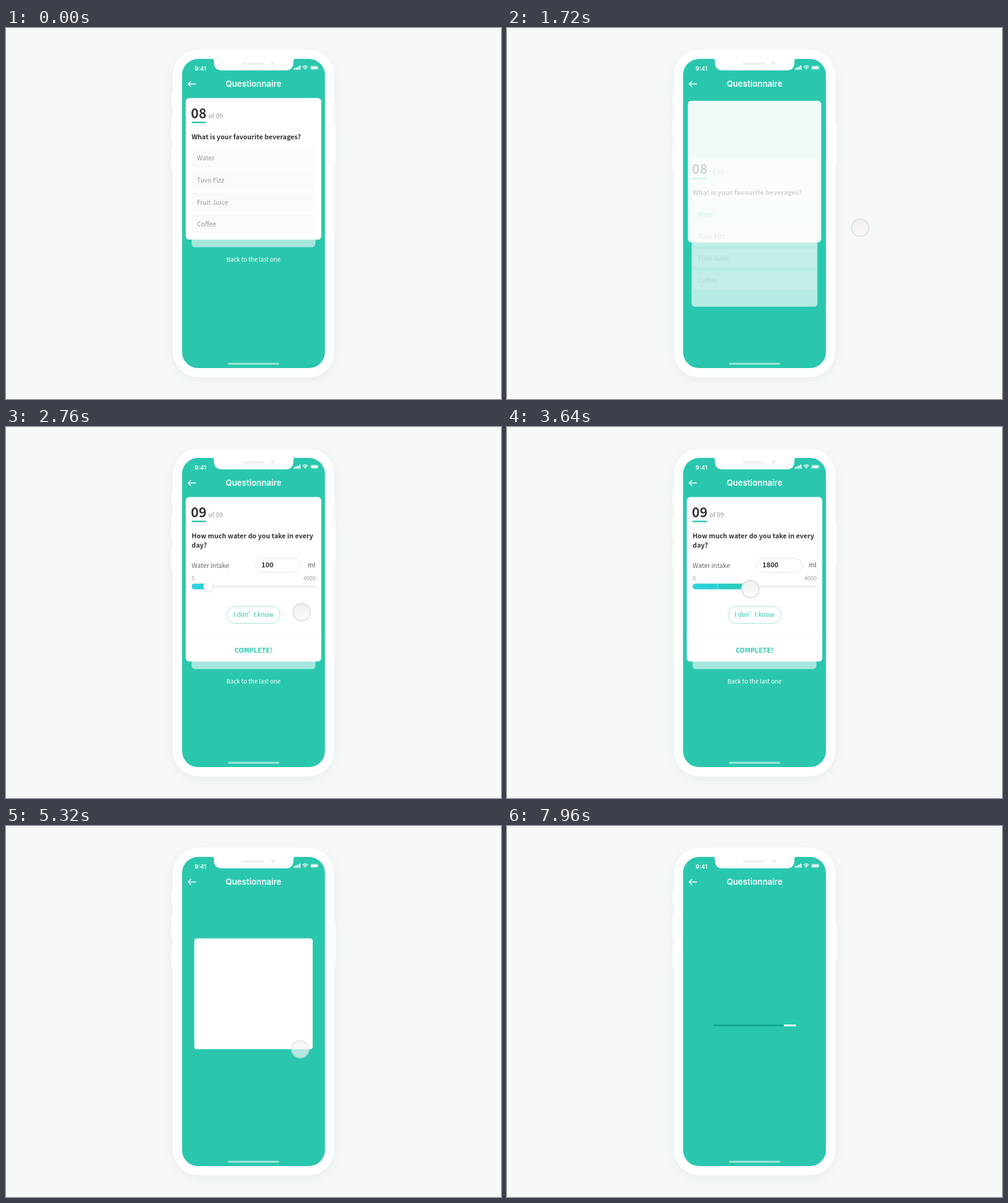
These frames come from a looping animation (800x600 px, 8 s). An HTML page:

```html
<!DOCTYPE html>
<html lang="en">
<head>
<meta charset="utf-8">
<title>Questionnaire</title>
<style>
  html, body { margin: 0; width: 100%; height: 100%; overflow: hidden; background: #f5f9f8; }
  svg { display: block; width: 800px; height: 600px; }
  text { font-family: "Noto Sans CJK SC", "Noto Sans", sans-serif; font-size: 10.4px; }
  .ui { font-family: Inter, sans-serif; font-weight: 600; fill: #fff; }
  .mid { text-anchor: middle; }
  .end { text-anchor: end; }
  .bold { font-weight: 700; fill: #333; }
  .num { font-size: 21.4px; }
  .ask { font-size: 10.7px; }
  .grey { fill: #999; }
  .teal { fill: #2ac7ae; }
  .phone { filter: drop-shadow(0 4px 8px rgba(40, 90, 80, .07)); }
  .knob { filter: drop-shadow(0 1px 1.5px rgba(0, 0, 0, .16)); }
</style>
</head>
<body>
<svg viewBox="0 0 800 600">
  <defs>
    <linearGradient id="water" gradientUnits="userSpaceOnUse" x1="300" x2="392" y1="0" y2="0">
      <stop offset="0" stop-color="#2dd4e2"/><stop offset="1" stop-color="#2ac7ae"/>
    </linearGradient>
    <linearGradient id="touch" x2="0" y2="1">
      <stop offset="0" stop-color="#eee"/><stop offset="1" stop-color="#fdfdfd"/>
    </linearGradient>
    <clipPath id="screen"><rect x="284.5" y="50" width="231" height="500" rx="26"/></clipPath>
  </defs>

  <g class="phone" fill="#fff">
    <rect x="267.5" y="107" width="6" height="19" rx="1"/>
    <rect x="267.5" y="144" width="6" height="38" rx="1"/>
    <rect x="267.5" y="192" width="6" height="38.500" rx="1"/>
    <rect x="527" y="157" width="6" height="62" rx="1"/>
    <rect x="269.500" y="35" width="261.500" height="530" rx="42"/>
  </g>

  <g clip-path="url(#screen)">
    <rect x="284" y="50" width="232" height="500" fill="#2ac7ae"/>
    <path d="M332 49.500q4 0 4 4v2q0 13 13 13h102.500q13 0 13-13v-2q0-4 4-4z" fill="#fff"/>
    <rect x="381" y="55.500" width="36" height="4" rx="2" fill="#f1f1f1"/>
    <circle cx="431" cy="57" r="3.300" fill="#f1f1f1"/>

    <text class="ui" x="304.700" y="68.600" font-size="9.500" style="font-size:9.500px">9:41</text>
    <g fill="#fff">
      <rect x="465.300" y="64.800" width="2" height="2.700" rx=".5"/>
      <rect x="468.100" y="63.700" width="2" height="3.800" rx=".5"/>
      <rect x="471" y="62.300" width="2" height="5.200" rx=".5"/>
      <rect x="473.900" y="60.800" width="2" height="6.700" rx=".5"/>
      <rect x="492.900" y="62.200" width="10.700" height="4.100" rx=".8"/>
      <path d="M483.500 67.400l-1.500-1.600q1.500-1.100 3 0z"/>
    </g>
    <g fill="none" stroke="#fff">
      <path d="M479.200 63q4.300-3.600 8.600 0M480.700 64.700q2.800-2.300 5.600 0" stroke-width="1.200"/>
      <rect x="491.900" y="61.200" width="12.700" height="6.100" rx="1.700" stroke-width=".6" opacity=".6"/>
      <path d="M307 90.500h-12.600m4.800-4.700l-4.800 4.700 4.800 4.700" stroke-width="1.300"/>
    </g>
    <text class="ui mid" x="400" y="95" style="font-size:13.300px">Questionnaire</text>
    <rect x="358.700" y="541.500" width="83" height="3" rx="1.500" fill="#fff" opacity=".55"/>

    <text id="back" class="mid" fill="#fff" style="font-size:9.600px">Back to the last one</text>
    <rect id="rear" rx="5.500" fill="#fff"/>
    <rect id="front" fill="#fff"/>

    <g id="first">
      <text class="bold num" x="298.800" y="145.600">08</text>
      <text class="grey" x="327" y="145.600">of 09</text>
      <rect x="300" y="151.500" width="23.500" height="2.500" rx="1" fill="#2ac7ae"/>
      <text class="bold ask" x="300" y="179.500">What is your favourite beverages?</text>
      <g id="rows"></g>
    </g>

    <g id="second">
      <text class="bold num" x="298.800" y="145.600">09</text>
      <text class="grey" x="327" y="145.600">of 09</text>
      <rect x="300" y="151.500" width="23.500" height="2.500" rx="1" fill="#2ac7ae"/>
      <text class="bold ask" x="300" y="179.500">How much water do you take in every</text>
      <text class="bold ask" x="300" y="195">day?</text>
      <text x="300" y="227.500" fill="#666">Water intake</text>
      <rect x="403" y="212.300" width="74" height="22.500" rx="11.250" fill="#fff" stroke="#ddd" stroke-width=".8"/>
      <text id="amount" class="bold" x="412.700" y="227.300" style="font-size:11px"></text>
      <text class="end" x="500.300" y="227.300" fill="#555">ml</text>
      <text class="grey" x="300" y="248.200" style="font-size:8.800px">0</text>
      <text class="grey end" x="500.300" y="248.200" style="font-size:8.800px">4000</text>
      <rect x="300" y="255.300" width="200" height="5" rx="2.500" fill="#f3f3f3"/>
      <rect id="fill" x="300" y="253.200" height="9.300" rx="4.650" fill="url(#water)"/>
      <path id="tickA" d="M340 253v9.500" stroke="#fff" stroke-width=".8" opacity=".6"/>
      <path id="tickB" d="M380 253v9.500" stroke="#fff" stroke-width=".8" opacity=".6"/>
      <circle id="knob" class="knob" cy="258" r="7.500" fill="#fff"/>
      <rect x="357" y="290" width="86" height="27.700" rx="13.850" fill="#fff" stroke="#2ac7ae" stroke-opacity=".5" stroke-width=".9"/>
      <text class="teal" x="368" y="307.400" style="font-size:10.200px">I don’<tspan x="400.200">t know</tspan></text>
      <path d="M290.500 342.500h219" stroke="#f3f3f3"/>
      <text class="bold mid" x="400" y="364.800" style="font-size:10.700px;fill:#2ac7ae">COMPLETE!</text>
    </g>

    <rect id="progress" x="332.500" y="321" height="3" rx="1.500" fill="#12a892"/>
  </g>

  <circle id="cursor" r="14" fill="url(#touch)" stroke="#e0e1e1" stroke-width="2"/>
</svg>

<script>
const LOOP = 8000;
const $ = id => document.getElementById(id);
const set = (id, attrs) => { for (const k in attrs) $(id).setAttribute(k, attrs[k]); };
const lerp = (a, b, p) => a + (b - a) * p;
const span = (t, a, b) => Math.min(1, Math.max(0, (t - a) / (b - a)));
const sine = p => (1 - Math.cos(Math.PI * p)) / 2;
const cubic = p => p < .5 ? 4 * p ** 3 : 1 - 4 * (1 - p) ** 3;
const ease = (t, a, b) => sine(span(t, a, b));
const bump = (t, centre, width) =>
  Math.abs(t - centre) < width / 2 ? Math.cos(Math.PI * (t - centre) / width) ** 2 : 0;

const drinks = ['Water', 'Tuvo Fizz', 'Fruit Juice', 'Coffee'];
$('rows').innerHTML = drinks.map((name, i) => {
  const y = 195 + i * 35.7;
  return `<rect id="row${i}" x="300" y="${y}" width="200" height="30.500" rx="3" fill="#fafafa"/>
    <text id="drink${i}" x="308.500" y="${y + 19.2}" fill="#999" font-weight="500">${name}</text>`;
}).join('');

// start, end, x, y, easing
const path = [
  [560, 860, 430, 210, sine],
  [1120, 1640, 571, 323, sine],
  [2520, 3080, 331.5, 262, sine],
  [3160, 3800, 394.5, 262, p => 1 - (1 - p) ** 3],
  [4200, 4400, 399.5, 262, sine],
  [4560, 4920, 399.5, 361, cubic],
  [5000, 5480, 501, 361, sine]
];

function drawCursor(t) {
  let x = 582, y = 270;
  for (const [a, b, tx, ty, curve] of path) {
    const p = curve(span(t, a, b));
    x = lerp(x, tx, p);
    y = lerp(y, ty, p);
  }
  set('cursor', { cx: x, cy: y, opacity: span(t, 540, 640) * (1 - span(t, 5240, 5480)) });
}

function drawCards(t) {
  const swap = bump(t, 1853, 953);
  const drop = 168 * bump(t, 1974, 1070);
  const grow = ease(t, 1440, 2160);
  const shut = ease(t, 5040, 5760);
  const tall = 229 + 37 * grow;

  const width = 219 - 19 * swap;
  set('front', {
    x: lerp(400 - width / 2, 332.5, shut),
    y: lerp(113.3 + drop + 7 * swap, 321, shut),
    width: lerp(width, 135, shut),
    height: lerp(tall, 3, shut),
    rx: lerp(5.5, 1.5, shut),
    opacity: 1 - .42 * swap
  });

  const rearWidth = 200 + 19 * swap;
  set('rear', {
    x: 400 - rearWidth / 2,
    y: 113.3 + (1 - swap) * (12.2 + 37 * grow),
    width: rearWidth,
    height: 229,
    opacity: (.58 + .42 * swap) * (1 - span(t, 5040, 5240))
  });

  const move = `translate(0 ${drop})`;
  set('first', { transform: move, opacity: 1 - span(t, 1400, 1800) });
  set('second', {
    transform: move,
    opacity: span(t, 2260, 2620) * (1 - span(t, 5040, 5280))
  });
  const late = t > 1900;
  set('back', {
    x: 400, y: late ? 415 : 378,
    opacity: late ? span(t, 2440, 2720) * (1 - span(t, 4940, 5120)) : 1 - span(t, 1400, 1640)
  });

  const picked = t >= 900;
  set('row0', { fill: picked ? '#effbfa' : '#fafafa' });
  set('drink0', { fill: picked ? '#2ac7ae' : '#999' });
}

function drawSlider(t) {
  const pull = 1 - (1 - span(t, 3160, 3800)) ** 3;
  const nudge = ease(t, 4200, 4400);
  const x = 326.5 + 63.5 * pull + 5 * nudge;
  set('knob', { cx: x });
  set('fill', { width: x - 300 });
  set('tickA', { visibility: x > 345 ? 'inherit' : 'hidden' });
  set('tickB', { visibility: x > 385 ? 'inherit' : 'hidden' });
  $('amount').textContent = 100 * Math.round(1 + 17 * pull + nudge);
}

function drawProgress(t) {
  const s = Math.max(0, t - 5960);
  set('progress', { width: .0407 * s + 3.1e-6 * s * s + 2.7e-9 * s ** 3 });
}

function render(now) {
  const t = now % LOOP;
  drawCards(t);
  drawSlider(t);
  drawProgress(t);
  drawCursor(t);
}

let start;
function tick(now) {
  start ??= now;
  render(now - start);
  requestAnimationFrame(tick);
}
render(0);
requestAnimationFrame(tick);
</script>
</body>
</html>
```
